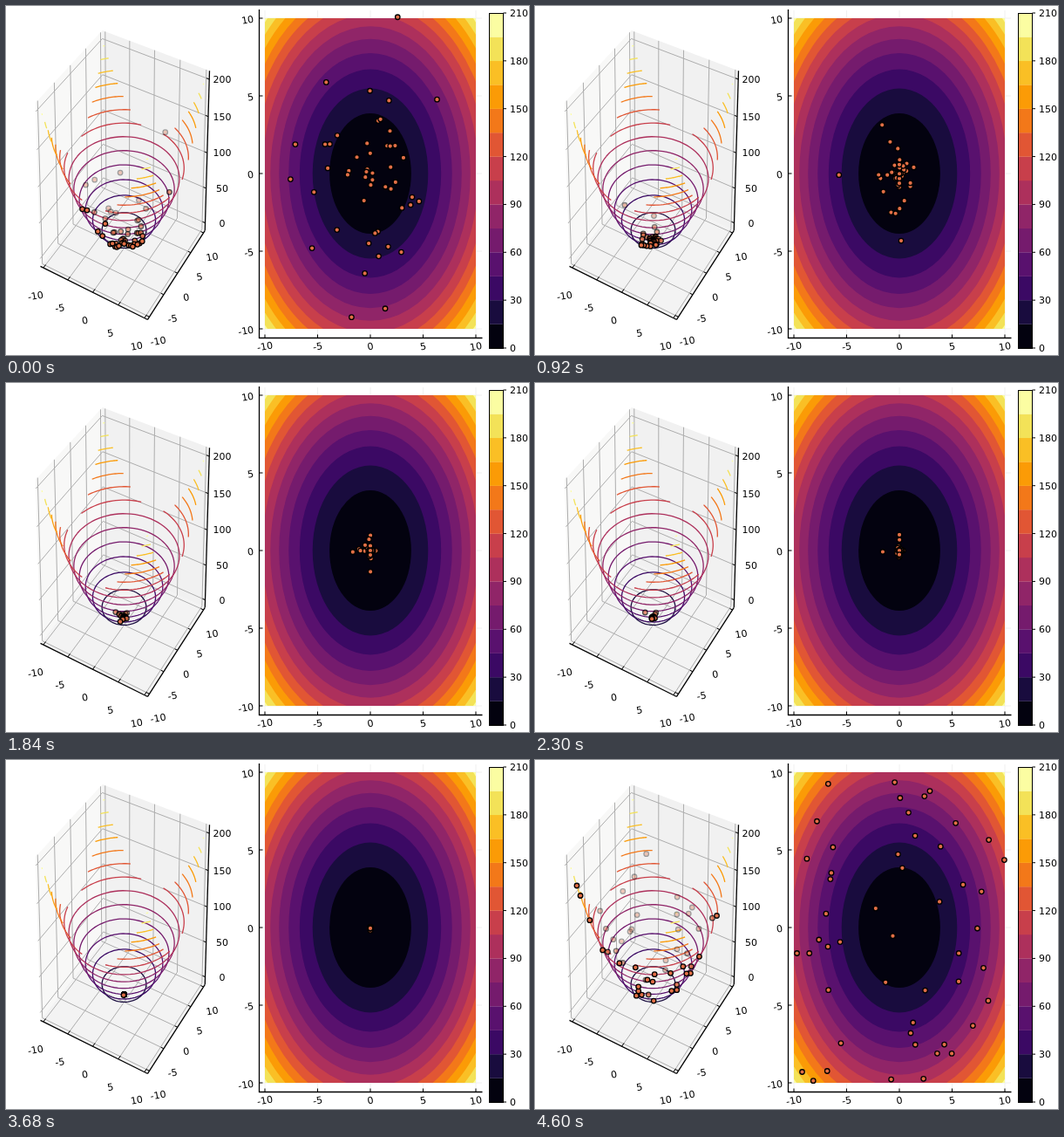
An HTML page for the animation above (5.06 s loop, 600 by 400 pixels).

```html
<!DOCTYPE html>
<html lang="en">
<head>
<meta charset="utf-8">
<title>Particle swarm</title>
<style>
  html, body { margin: 0; width: 100%; height: 100%; overflow: hidden; background: #fff; }
  svg { display: block; width: 600px; height: 400px; }
  text { font: 11px "DejaVu Sans", sans-serif; fill: #000; }
  .grid { stroke: #adadad; }
  .faint { stroke: #f0f0f0; }
  .axis { stroke: #000; stroke-width: 1.3; }
  .tick { stroke: #000; }
  .frame { fill: none; stroke: #000; }
  .ring { fill: none; stroke-width: 1.3; }
  .dot { fill: #e26f46; stroke: #000; stroke-width: 1.3; }
  .step { visibility: hidden; animation: show 5060ms step-end infinite; }
  @keyframes show {
    0% { visibility: visible; }
    9.0909%, 100% { visibility: hidden; }
  }
</style>
</head>
<body>
<svg id="stage" viewBox="0 0 600 400">
  <clipPath id="area"><rect x="297" y="14" width="242" height="356"/></clipPath>
</svg>
<script>
const stage = document.getElementById('stage');
// Dark to bright, one colour per band of 15
const COLORS = ['#03020f', '#190c3e', '#3b0964', '#59116e', '#751b6d', '#902568', '#ad305c',
  '#c83f4b', '#e15634', '#f37819', '#fb9b06', '#fabf25', '#f3e258', '#fbfda2'];
const TICKS = [-10, -5, 0, 5, 10], LEVELS = [0, 50, 100, 150, 200];
const LIMIT = 10.6, COUNT = 50, STEPS = 11, STEP_MS = 460;

function add(tag, attrs, parent = stage) {
  const el = document.createElementNS('http://www.w3.org/2000/svg', tag);
  for (const key in attrs) el.setAttribute(key, attrs[key]);
  return parent.appendChild(el);
}
function line([x1, y1], [x2, y2], cls) {
  add('line', { x1, y1, x2, y2, class: cls });
}
function label(text, x, y, anchor, tilt = 0) {
  const attrs = { x, y: y + 4, 'text-anchor': anchor };
  if (tilt) attrs.transform = `rotate(${tilt} ${x} ${y})`;
  add('text', attrs).textContent = text;
}

// Flat panel mapping
const px = x => 418 + 12.1 * x;
const py = y => 192 - 17.8 * y;

// Camera at azimuth 30, elevation 30, looking at the box [-1, 1]^3
const COS = Math.sqrt(3) / 2, SIN = .5, DISTANCE = 18;
const depth = (x, y) => COS * y - SIN * x;
function view(x, y, z) {
  const right = COS * x + SIN * y, back = depth(x, y);
  const up = SIN * back + COS * z;
  const w = 1 + (COS * back - SIN * z) / DISTANCE;
  return [135.5 + 71 * right / w, 187.5 - 106.8 * up / w];
}
const height = z => -.9 + .009 * z;
const place = (x, y, z) => view(x / LIMIT, y / LIMIT, height(z));

function drawBox() {
  const wall = (fill, ...corners) =>
    add('polygon', { fill, points: corners.map(c => view(...c)).join(' ') });
  wall('#f8f8f7', [-1, -1, -1], [-1, 1, -1], [-1, 1, 1], [-1, -1, 1]);
  wall('#f1f1f1', [-1, 1, -1], [1, 1, -1], [1, 1, 1], [-1, 1, 1]);
  wall('#f3f3f3', [-1, -1, -1], [1, -1, -1], [1, 1, -1], [-1, 1, -1]);

  for (const v of TICKS) {
    const t = v / LIMIT;
    line(view(t, -1, -1), view(t, 1, -1), 'grid');
    line(view(t, 1, -1), view(t, 1, 1), 'grid');
    line(view(-1, t, -1), view(1, t, -1), 'grid');
    line(view(-1, t, -1), view(-1, t, 1), 'grid');
  }
  for (const v of LEVELS) {
    const z = height(v);
    line(view(-1, -1, z), view(-1, 1, z), 'grid');
    line(view(-1, 1, z), view(1, 1, z), 'grid');
  }

  line(view(-1, -1, -1), view(1, -1, -1), 'axis');
  line(view(1, -1, -1), view(1, 1, -1), 'axis');
  line(view(1, 1, -1), view(1, 1, 1), 'axis');

  for (const v of TICKS) {
    const t = v / LIMIT;
    const a = view(t, -1, -1), b = view(1, t, -1);
    line(a, view(t, -.93, -1), 'tick');
    line(b, view(.95, t, -1), 'tick');
    label(v, a[0] - 9, a[1] + 32, 'middle', -10);
    label(v, b[0] + 10, b[1] + 27.5, 'middle', -10);
  }
  for (const v of LEVELS) {
    const z = height(v), p = view(1, 1, z);
    line(p, view(.95, 1, z), 'tick');
    label(v, 248, p[1], 'middle');
  }
}

// Level circles of x² + y², cut off by the square domain
function drawRings() {
  for (let i = 1; i < COLORS.length; i++) {
    const z = 15 * i, r = Math.sqrt(z);
    const start = r > 10 ? Math.acos(10 / r) : 0;
    const sweep = Math.PI / 2 - 2 * start;
    let d = '';
    for (let q = 0; q < 4; q++) {
      for (let n = 0; n <= 20; n++) {
        const a = q * Math.PI / 2 + start + sweep * n / 20;
        d += (n ? 'L' : 'M') + place(r * Math.cos(a), r * Math.sin(a), z);
      }
    }
    add('path', { d, class: 'ring', stroke: COLORS[i] });
  }
}

function drawPanel() {
  for (const v of TICKS) {
    line([px(v), 5], [px(v), 380], 'faint');
    line([291, py(v)], [546, py(v)], 'faint');
  }
  const area = add('g', { 'clip-path': 'url(#area)' });
  for (let i = COLORS.length - 1; i >= 0; i--) {
    const r = Math.sqrt(15 * (i + 1));
    add('ellipse', { cx: px(0), cy: py(0), rx: 12.1 * r, ry: 17.8 * r, fill: COLORS[i] }, area);
  }
  line([290.5, 4], [290.5, 381], 'axis');
  line([290, 380.5], [546.5, 380.5], 'axis');
  for (const v of TICKS) {
    line([px(v), 380], [px(v), 376.5], 'tick');
    line([291, py(v)], [294.5, py(v)], 'tick');
    label(v, px(v), 390, 'middle', -10);
    label(v, 284, py(v) + .5, 'end', -10);
  }
}

function drawBar() {
  const y = v => 392 - v * 384 / 210;
  COLORS.forEach((fill, i) =>
    add('rect', { x: 554.5, y: y(15 * i + 15), width: 16, height: 27.6, fill }));
  add('rect', { x: 554.5, y: 8.5, width: 16, height: 384, class: 'frame' });
  for (let v = 0; v <= 210; v += 30) {
    line([570.5, y(v)], [574, y(v)], 'tick');
    label(v, 578, y(v), 'start');
  }
}

// Seeded random number between low and high
let seed = 20177;
function random(low, high) {
  seed = (seed * 16807) % 2147483647;
  return low + (high - low) * seed / 2147483647;
}

// Each step pulls every particle towards the minimum, sometimes past it
const pull = v => v * random(-.6, 1.2);

function swarmSteps() {
  let swarm = Array.from({ length: COUNT }, () => [random(-10, 10), random(-10, 10)]);
  const steps = [];
  steps[STEPS - 1] = swarm;
  for (let k = 0; k < STEPS - 1; k++)
    steps[k] = swarm = swarm.map(p => p.map(pull));
  return steps;
}

function dot([cx, cy], opacity, parent) {
  add('circle', { cx, cy, r: 2.75, opacity, class: 'dot' }, parent);
}

function drawSwarm(swarm, k) {
  const group = add('g', { class: 'step', style: `animation-delay:${k * STEP_MS}ms` });
  const sorted = [...swarm].sort((a, b) => depth(...b) - depth(...a));
  for (const [x, y] of sorted) {
    const alpha = Math.min(1, Math.max(.35, .8 - .12 * depth(x, y)));
    dot(place(x, y, x * x + y * y), alpha, group);
  }
  for (const [x, y] of swarm) dot([px(x), py(y)], 1, group);
}

drawBox();
drawRings();
drawPanel();
drawBar();
swarmSteps().forEach(drawSwarm);
</script>
</body>
</html>
```
